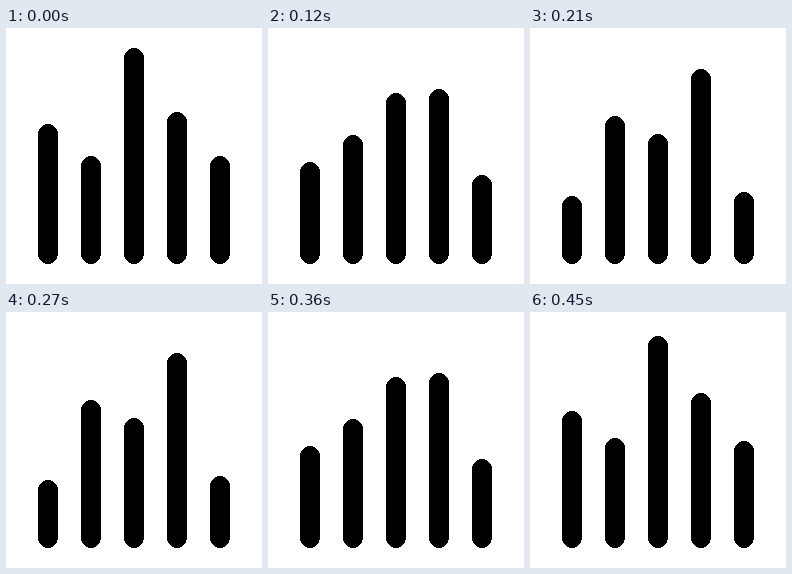
An HTML page that plays this animation: 256 px wide and 256 px high, repeating every 480 ms.

```html
<!DOCTYPE html>
<html lang="en">
<head>
<meta charset="utf-8">
<title>Equalizer bars</title>
<style>
  html, body { margin: 0; width: 100%; height: 100%; overflow: hidden; background: #fff; }
  svg { display: block; width: 100%; height: 100%; }
  rect { shape-rendering: crispEdges; }
</style>
</head>
<body>
<svg id="stage" viewBox="0 0 256 256"></svg>
<script>
  const LOOP = 480, STEP = 30, BOTTOM = 236, WIDTH = 20;

  // Each bar swings from its start height to its end height and back.
  const bars = [
    { x: 32, from: 96, to: 172 },
    { x: 75, from: 128, to: 87 },
    { x: 118, from: 20, to: 111 },
    { x: 161, from: 84, to: 39 },
    { x: 204, from: 128, to: 166 },
  ];

  const stage = document.getElementById('stage');
  for (const bar of bars) {
    bar.rect = document.createElementNS('http://www.w3.org/2000/svg', 'rect');
    bar.rect.setAttribute('x', bar.x);
    bar.rect.setAttribute('width', WIDTH);
    bar.rect.setAttribute('rx', WIDTH / 2);
    stage.append(bar.rect);
  }

  // Soft ease in and out: 0 at the loop start, 1 halfway.
  function swing(time) {
    const angle = 2 * Math.PI * time / LOOP;
    return (1 - 0.97 * Math.cos(angle) - 0.03 * Math.cos(3 * angle)) / 2;
  }

  function draw() {
    const time = Math.floor(performance.now() % LOOP / STEP) * STEP;
    const amount = swing(time);
    for (const { rect, from, to } of bars) {
      const top = Math.floor(from + (to - from) * amount);
      rect.setAttribute('y', top);
      rect.setAttribute('height', BOTTOM - top);
    }
    requestAnimationFrame(draw);
  }
  draw();
</script>
</body>
</html>
```
